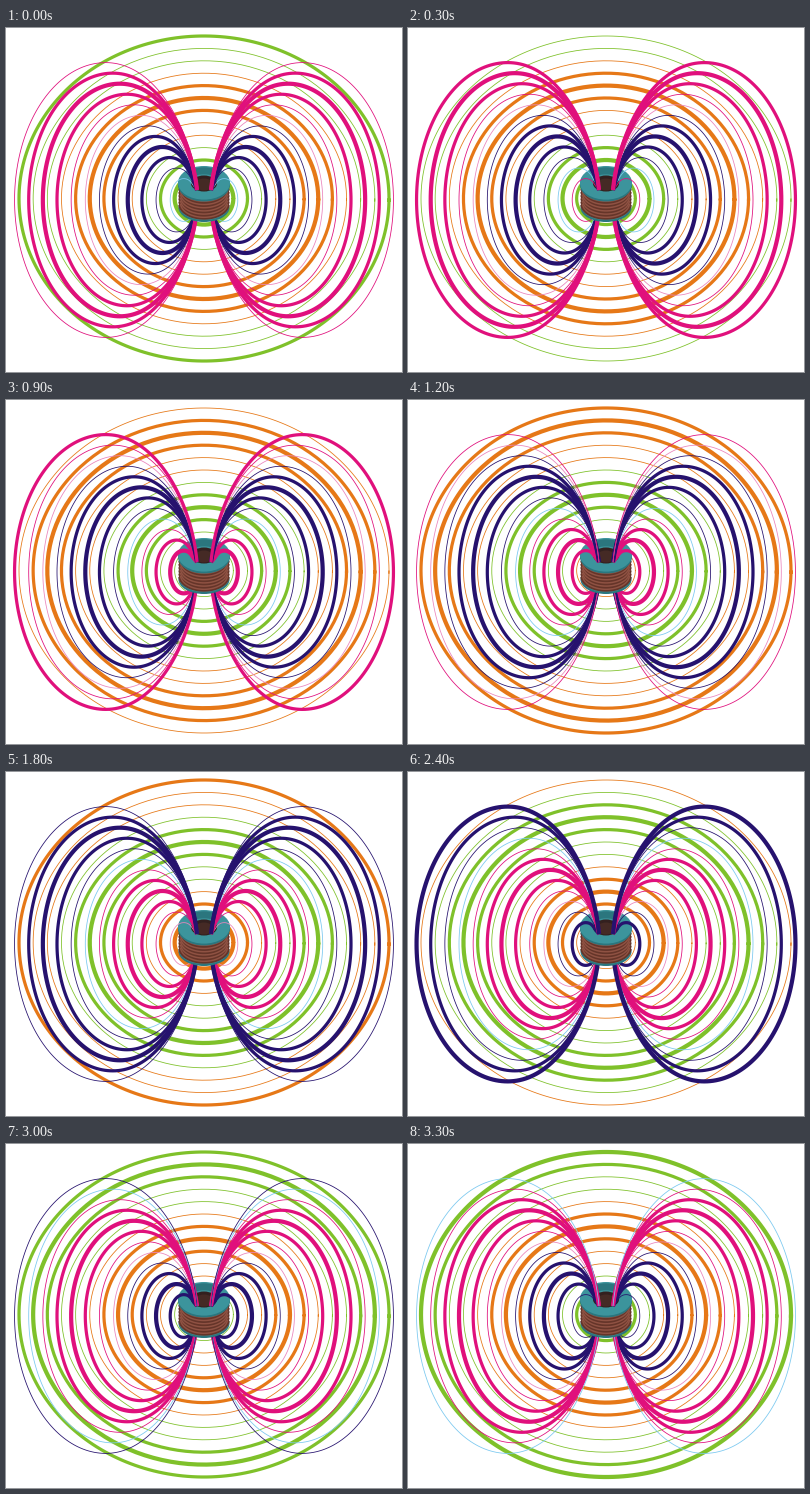
A matplotlib script that plays this animation: 396x344 px, repeating every 3600 ms.

```python
import numpy as np
import matplotlib.pyplot as plt
from matplotlib.animation import FuncAnimation
from matplotlib.patches import Ellipse

W, H, DPI = 396, 344, 100
STEPS, COUNT = 12, 12
CX, CY = 198, 170.5
PX = 72 / DPI

ORANGE, GREEN = "#e67817", "#7fc12a"
PINK, NAVY = "#e0107c", "#26126e"
PALE_PINK, CYAN = "#ea86bd", "#7cc9f0"
TEAL, DARK_TEAL = "#3c949c", "#2b767e"

# line width by distance from the nearest wave crest
WIDTHS = [4.2, 3.2, 0.8, 0.8]

fig = plt.figure(figsize=(W / DPI, H / DPI), dpi=DPI, facecolor="white")
ax = fig.add_axes([0, 0, 1, 1])
ax.set_xlim(0, W)
ax.set_ylim(H, 0)
ax.axis("off")


def line(x, y, z, color="black", width=1.0):
    return ax.plot(x, y, color=color, lw=width * PX, zorder=z,
                   solid_capstyle="butt")[0]


def disc(y, rx, ry, color, z):
    ax.add_patch(Ellipse((CX, y), 2 * rx, 2 * ry, fc=color, ec="none", zorder=z))


def bezier(p0, p1, p2, p3, n=50):
    t = np.linspace(0, 1, n)[:, None]
    p0, p1, p2, p3 = map(np.array, (p0, p1, p2, p3))
    return ((1 - t) ** 3 * p0 + 3 * t * (1 - t) ** 2 * p1
            + 3 * t ** 2 * (1 - t) * p2 + t ** 3 * p3)


def half_lobe(k, side):
    """Left half-loop; side is -1 for the upper part, 1 for the lower."""
    mid = 172
    left = 8.55 + 14.15 * k
    top_x = (left + 191) / 2
    height = 137.4 - 10.55 * k
    peak = mid + side * height
    end = 162 if side < 0 else 181
    a = np.linspace(0, np.pi / 2, 50)
    x = top_x - (top_x - left) * np.cos(a)
    y = mid + side * height * np.sin(a)
    tail = bezier((top_x, peak),
                  (top_x + 0.55 * (191 - top_x), peak),
                  (185.5, end + 0.48 * (peak - end)),
                  (191, end))
    return np.r_[x, tail[1:, 0]], np.r_[y, tail[1:, 1]]


def make_ring(k):
    a = np.linspace(0, 2 * np.pi + 0.02, 240)
    rx, ry = 185 - 14.15 * k, 162.5 - 12.4 * k
    return line(CX + rx * np.cos(a), CY + ry * np.sin(a), 1)


def make_lobe(k):
    parts = []
    for side, base in ((1, 2), (-1, 50)):
        x, y = half_lobe(k, side)
        for px in (x, 2 * CX - x):
            parts.append(line(px, y, base + COUNT - k))
    return parts


def draw_coil():
    disc(179.5, 25.5, 14.5, DARK_TEAL, 30)
    disc(178, 25, 14, TEAL, 31)
    disc(176.5, 24, 14.5, "#5e3129", 32)
    a = np.linspace(0.05, np.pi - 0.05, 60)
    for i in range(6):
        y = 176 - 3.2 * i
        line(CX + 24 * np.cos(a), y + 14 * np.sin(a), 33, "#653529", 3.4)
        line(CX + 23.4 * np.cos(a), y - 0.7 + 14 * np.sin(a), 34, "#8f5243", 1.5)
    disc(157, 26, 16.5, DARK_TEAL, 36)
    disc(154.8, 26, 16.8, TEAL, 37)
    b = np.linspace(1.25 * np.pi, 1.75 * np.pi, 30)
    line(CX + 19 * np.cos(b), 154.8 + 12 * np.sin(b), 38, DARK_TEAL, 7)
    disc(155.5, 13, 8, "#33201f", 39)
    disc(156.5, 9, 6, "#452a25", 40)


rings = [make_ring(k) for k in range(COUNT)]
lobes = [make_lobe(k) for k in range(COUNT)]
draw_coil()


def width(d):
    d %= 6
    return WIDTHS[min(d, 6 - d)] * PX


def ring_color(d):
    return ORANGE if d <= 3 or d >= 10 else GREEN


def lobe_color(d):
    if d == 3:
        return PALE_PINK
    if d == 9:
        return CYAN
    return PINK if d < 3 or d > 9 else NAVY


def update(n):
    # the wave moves outward by one curve per step
    for k in range(COUNT):
        d = (k - 5 + n) % STEPS
        rings[k].set(color=ring_color(d), linewidth=width(d))
        d = (k - 2 + n) % STEPS
        for part in lobes[k]:
            part.set(color=lobe_color(d), linewidth=width(d))
    return rings + [p for lobe in lobes for p in lobe]


anim = FuncAnimation(fig, update, frames=STEPS, interval=300,
                     repeat=True, repeat_delay=0, blit=False)
plt.show()
```
